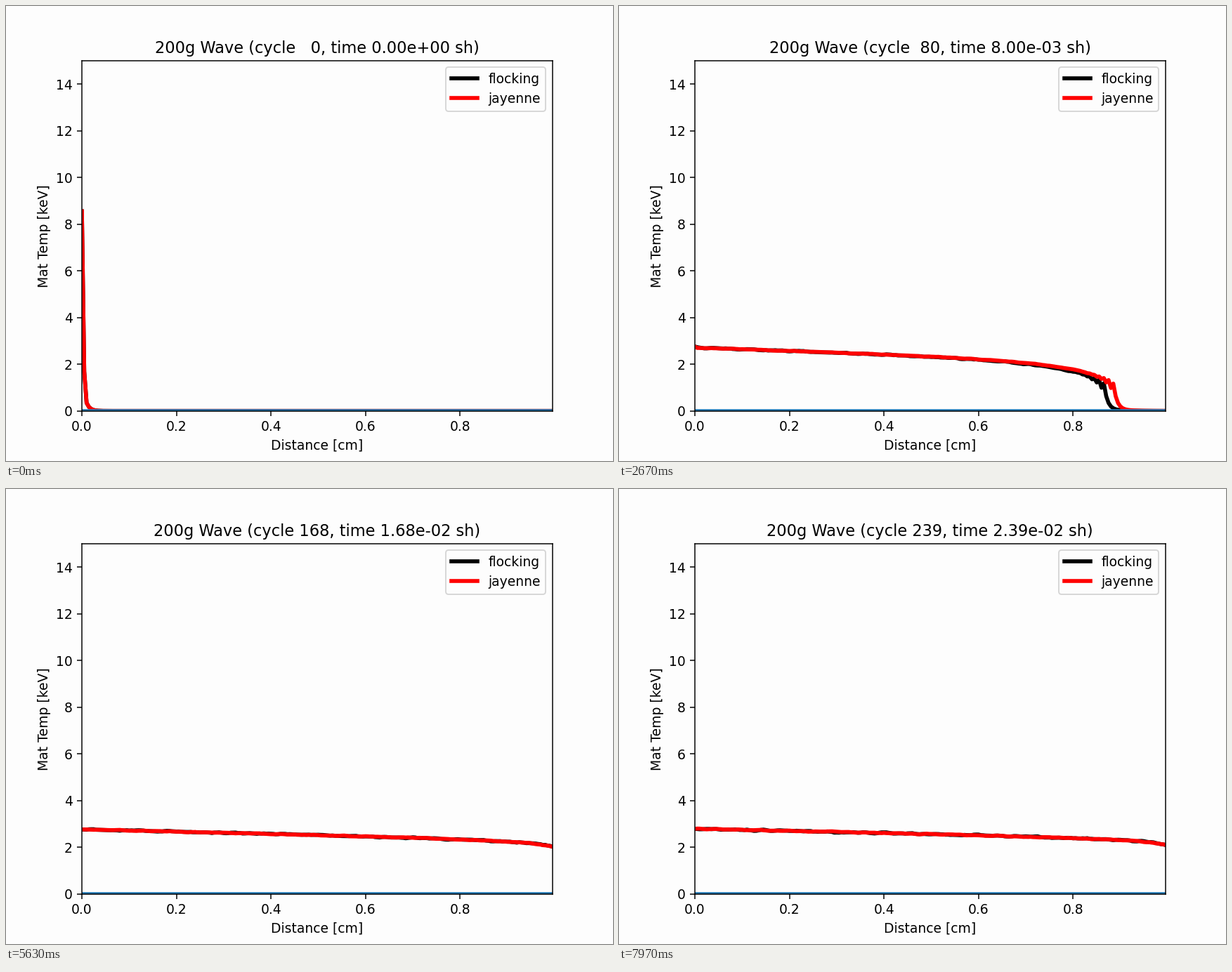
Animation, 864 px wide and 648 px high, one loop 8000 ms. Source, as a matplotlib script:

```python
import numpy as np
import matplotlib.pyplot as plt
from matplotlib.animation import FuncAnimation

PAPER = "#fdfdfd"
CYCLES = 240
STEP = 1e-4        # time per cycle [sh]
DX = 0.005         # cell width [cm]
EXIT = 92          # cycle at which the wave reaches the far edge
x = np.arange(200) * DX

plt.rcParams.update({
    "font.family": "DejaVu Sans",
    "figure.facecolor": PAPER,
    "axes.facecolor": PAPER,
})


def front(c, lagging):
    """Position of the wave front; beyond the edge it relaxes to steady state."""
    if c < EXIT:
        pos = 0.649 * ((c + 0.28) / 56.28) ** 0.886
    else:
        pos = 1.45 - 0.45 * np.exp(-(c - EXIT) / 59)
    if lagging:
        pos -= 0.02 * (min(c, EXIT) / 80) ** 3.4 * np.exp(-max(c - EXIT, 0) / 12)
    return pos


def profile(c, lagging=False):
    """Material temperature in every cell at cycle c."""
    xf = front(c, lagging)
    base = 2.68 + 0.076 * np.log((c + 1) / 57)
    s = x / xf
    hot = base * np.clip(1 - s, 0.004, 1) ** 0.17
    hot *= 1 - 0.05 * s * (1 - s)
    hot *= 1 - 0.1 * np.minimum(s, 1) ** 12

    # cell-to-cell ripple just behind the front
    j = int(xf / DX) - np.arange(x.size)
    ripple = np.where(j % 2 == 0, 1, -1) * np.exp(-np.abs(j) / 3)
    hot += 0.2 * min(1, c / 20) * ripple

    rng = np.random.default_rng(2 * c + lagging)
    noise = np.convolve(rng.normal(size=x.size), np.ones(3) / 3, "same")
    hot += (0.022 if lagging else 0.012) * min(1, c / 100) * noise

    d = np.maximum(x - xf, 0)
    cold = 0.62 * np.exp(-d / 0.007) + 0.1 * min(1, c / 30) * np.exp(-d / 0.025)
    temp = np.where(s < 1, hot, cold)

    if c > EXIT:   # energy lost through the open edge
        loss = 0.14 * (1 - np.exp(-(c - EXIT) / 35))
        temp -= loss * np.exp(-(x[-1] - x) / 0.04)

    # the first cell radiates its initial energy away
    temp[0] = (base ** 4 + 5310 * np.exp(-0.0896 * c)) ** 0.25
    return temp


fig, ax = plt.subplots(figsize=(6.4, 4.8), dpi=135)
black, = ax.plot(x, profile(0, True), color="black", lw=3, label="flocking")
red, = ax.plot(x, profile(0), color="red", lw=3, label="jayenne")
ax.plot(x, np.zeros_like(x), color="C0", lw=3)
ax.set_xlim(0, x[-1])
ax.set_ylim(0, 15)
ax.set_xticks([0, 0.2, 0.4, 0.6, 0.8])
ax.set_xlabel("Distance [cm]")
ax.set_ylabel("Mat Temp [keV]")
title = ax.set_title("")
ax.legend(loc="upper right")


def update(c):
    black.set_ydata(profile(c, True))
    red.set_ydata(profile(c))
    title.set_text(f"200g Wave (cycle {c:3d}, time {c * STEP:.2e} sh)")
    return black, red, title


anim = FuncAnimation(fig, update, frames=CYCLES, interval=8000 / CYCLES,
                     init_func=lambda: update(0), repeat=True, repeat_delay=0)
plt.show()
```
